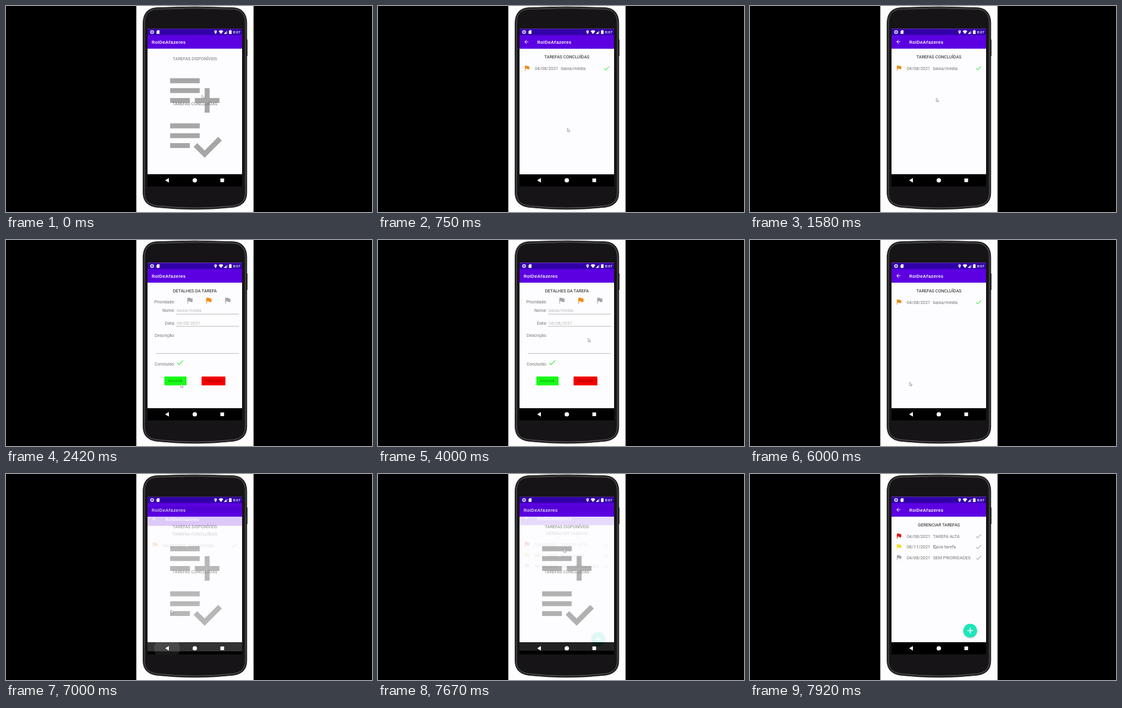
These frames come from a looping animation (600x338 px, 8000 ms). An HTML page:

```html
<!DOCTYPE html>
<html lang="pt">
<head>
<meta charset="utf-8">
<title>RolDeAfazeres</title>
<style>
html, body { margin: 0; width: 100%; height: 100%; overflow: hidden; background: #000; }
svg { display: block; width: 100vw; height: 100vh; }
text { font-family: Roboto, "Noto Sans", sans-serif; font-size: 7.25px; fill: #757575; }
.bar { font-size: 8.07px; font-weight: 500; fill: #fff; letter-spacing: .2px; }
.head { font-size: 7.1px; text-anchor: middle; }
.dark { fill: #1c1c1c; }
.label { font-size: 7.1px; text-anchor: end; }
.hint { fill: #bcbcbc; }
.btn { font-size: 5.66px; font-weight: 500; text-anchor: middle; letter-spacing: .5px; fill: #000; fill-opacity: .38; }
.clock { font-size: 6px; font-weight: 500; fill: #fff; }
</style>
</head>
<body>
<svg id="stage" viewBox="0 0 600 338" preserveAspectRatio="none"></svg>
<script>
const LOOP = 8000, STEP = 1000 / 12, SLIDE = 20.6;
const APP = 'RolDeAfazeres';
const MID = 309.7, LEFT = 232, TOP = 37.6, WIDE = 155, NAV = 276, END = 296;
const GREY = '#a7a6a7', ORANGE = '#f08a10', GREEN = '#42ee42', INDIGO = '#3200a8';

// Outlines on a 24-unit grid
const ICON = {
  flag: 'M14.4 6 14 4H5v17h2v-7h5.6l.4 2h7V6z',
  done: 'M9 16.2 4.8 12 3.4 13.4 9 19 21 7 19.6 5.6z',
  back: 'M20 11H7.8l5.6-5.6L12 4l-8 8 8 8 1.4-1.4L7.8 13H20z',
  lines: 'M2 6h12v2H2zM2 10h12v2H2zM2 14h8v2H2z',
  plus: 'M18 14v-4h-2v4h-4v2h4v4h2v-4h4v-2z',
  check: 'M21.5 11.5 23 13l-7 7-4.5-4.5L13 14l3 3z'
};

const rect = (x, y, w, h, fill, more = '') =>
  `<rect x="${x}" y="${y}" width="${w}" height="${h}" fill="${fill}" ${more}/>`;
const disc = (x, y, r, fill, more = '') =>
  `<circle cx="${x}" cy="${y}" r="${r}" fill="${fill}" ${more}/>`;
const shape = (d, fill = '#fff', more = '') => `<path d="${d}" fill="${fill}" ${more}/>`;
const text = (x, y, s, cls = '') => `<text x="${x}" y="${y}" class="${cls}">${s}</text>`;
// Icon centred on x, y
const icon = (d, x, y, k, fill) =>
  shape(d, fill, `transform="translate(${x} ${y}) scale(${k}) translate(-12 -12)"`);
const line = (x, y) => rect(x, y, 382 - x, .7, '#a4a4a4');
const title = s => text(MID, 85.9, s, 'head dark');

const screen = (id, hasBack, body) => `<g id="${id}">
  ${rect(LEFT, TOP, WIDE, END - TOP, '#fdfcfe')}
  ${rect(LEFT, TOP, WIDE, 70 - TOP, '#5c00e2')}
  ${rect(LEFT, TOP, WIDE, 10, INDIGO)}
  ${rect(LEFT, NAV, WIDE, END - NAV, '#000')}
  ${hasBack ? icon(ICON.back, 243.4, 58.7, .404, '#fff') : ''}
  ${text(hasBack ? 261 : 238.7, 61.7, APP, 'bar')}
  ${body}</g>`;

const row = (i, color, date, name, tick) => {
  const y = 102 + 17.7 * i;
  return icon(ICON.flag, 244.2, y - .3, .48, color) +
    text(257, y + 2.6, date) + text(300, y + 2.6, name) +
    icon(ICON.done, 374.7, y, .5, tick);
};

const button = (x, w, fill, s) =>
  rect(x, 224, w, 14.5, fill, 'rx="1.3"') + text(x + w / 2, 233.4, s, 'btn');

const tile = (y, mark, s) =>
  icon(ICON.lines + mark, 309.5, y + 56.3, 4.04, GREY) + text(MID, y + 2.5, s, 'head');

const home = screen('home', false,
  tile(86.5, ICON.plus, 'TAREFAS DISPONÍVEIS') +
  tile(160.5, ICON.check, 'TAREFAS CONCLUÍDAS'));

const list = screen('list', true,
  title('TAREFAS CONCLUÍDAS') + row(0, ORANGE, '04/08/2021', 'baixa/média', GREEN));

const field = (y, label, hint = '') => text(277, y, label, 'label') + text(280, y, hint, 'hint');

const detail = screen('detail', false,
  title('DETALHES DA TAREFA') +
  field(104.4, 'Prioridade:') + field(118.4, 'Nome:', 'baixa/média') +
  field(138.7, 'Data:', '04/08/2021') + field(159, 'Descrição:') + field(205.5, 'Concluído:') +
  [GREY, ORANGE, GREY].map((c, i) => icon(ICON.flag, 301.3 + 31 * i, 99.4, .57, c)).join('') +
  line(279, 121.4) + line(279, 141.4) + line(246, 185.8) +
  icon(ICON.done, 285.5, 201, .6, GREEN) +
  button(259.6, 36.4, '#16fb16', 'SALVAR') + button(320.6, 39, '#f20202', 'EXCLUIR'));

const manage = screen('manage', true,
  title('GERENCIAR TAREFAS') +
  row(0, '#e01212', '04/08/2021', 'TAREFA ALTA', GREY) +
  row(1, '#f5dc1c', '08/11/2021', 'Nova tarefa', GREY) +
  row(2, GREY, '04/08/2021', 'SEM PRIORIDADES', GREY) +
  disc(361, 258.3, 11.8, '#000', 'opacity=".13"') + disc(361, 257, 11.3, '#1de6b9') +
  shape('M356.5 257h9M361 252.5v9', 'none', 'stroke="#fff" stroke-width="1.6"'));

// Symmetric phone outline, drawn d pixels inside the edge
function shell(d, fill, stroke) {
  const l = MID - 85.4 + d, r = MID + 85.4 - d, a = MID - 63, b = MID + 63;
  const t = 2.4 + d, u = 330.5 - d;
  return shape(`M${l} 29C${l} 12 ${l + 8} ${t + 1} ${a} ${t}Q${MID} ${t - 3} ${b} ${t}` +
    `C${r - 8} ${t + 1} ${r} 12 ${r} 29V306C${r} 321 ${r - 8} ${u - 2} ${b} ${u}` +
    `Q${MID} ${u + 7} ${a} ${u}C${l + 8} ${u - 2} ${l} 321 ${l} 306Z`,
    fill, `stroke="${stroke}" stroke-width=".9"`);
}

const phone =
  rect(213.6, 0, 192.2, 338, '#fdfdfe') + rect(394.4, 55, 1.6, 27, '#444') +
  shell(.3, '#1d1d1e', '#262627') + shell(2.8, '#161417', '#68686a') +
  rect(291, 1, 36, 4, '#333335', 'rx="2"');

const status =
  disc(239.5, 42.7, 2.4, 'none', 'stroke="#fff" stroke-width="1.3"') + disc(239.5, 42.7, .7, '#fff') +
  shape('M248.3 39.8h3.3v6h-4.8v-4.4z') +
  shape('M343.6 46.2Q341.5 43.2 341.5 41.8a2.1 2.1 0 0 1 4.2 0Q345.7 43.2 343.6 46.2z') +
  disc(343.6, 41.8, .7, INDIGO) +
  shape('M348.6 41.2Q352.4 38.4 356.2 41.2L352.4 45.9z') +
  shape('M357.2 45.8 363 40v5.8z', '#fff', 'fill-opacity=".45"') + shape('M357.2 45.8 361 42v3.8z') +
  shape('M366.9 39.4h1.6v.7h1.3v5.8h-4.2v-5.8h1.3z') +
  text(372.3, 44.9, '8:07', 'clock');

const nav = shape('M261 286 267 282.3v7.4z') + disc(309.5, 286, 3.6, '#fff') +
  rect(351.5, 283, 6, 6, '#fff', 'rx=".4"');

document.getElementById('stage').innerHTML =
  `<defs><clipPath id="glass">${rect(LEFT, TOP, WIDE, END - TOP, '#fff')}</clipPath>
  <clipPath id="navbar">${rect(LEFT, NAV, WIDE, END - NAV, '#fff')}</clipPath></defs>
  ${rect(0, 0, 600, 338, '#000')}${phone}
  <g clip-path="url(#glass)">${home}${list}${detail}${manage}</g>
  <g clip-path="url(#navbar)">${disc(264, 286, 21, '#fff', 'id="ripple"')}</g>
  ${status}${nav}
  ${shape('M0 0V6.2L1.4 5 2.4 7 3.3 6.6 2.5 4.6H4.3Z', '#f6f6f6',
    'id="cursor" stroke="#808080" stroke-width=".6" stroke-linejoin="round"')}`;

// When each window slides in and out over the ones below it
const windows = [
  { id: 'list', open: 535, close: 6780 },
  { id: 'detail', open: 1850, close: 5560 },
  { id: 'manage', open: 7640, close: Infinity }
];
const PRESS = 90; // the back button lights up this long before a window closes

// Pointer moves: start, end, x, y
const moves = [
  [0, 330, 310.5, 200], [1420, 1750, 300, 100], [1920, 2420, 286.5, 236],
  [2420, 3080, 286, 201], [3250, 3750, 331, 97], [3920, 4080, 358, 225],
  [4250, 4670, 240, 55], [4670, 5080, 267, 285], [5580, 6000, 261.7, 233],
  [6000, 6420, 266, 286], [6670, 7000, 270.5, 223], [7000, 7420, 305, 125],
  [7580, 7830, 302, 116]
];

const clamp = v => Math.max(0, Math.min(1, v));
const ease = u => u * u * (3 - 2 * u);
const el = id => document.getElementById(id);

function pointer(t) {
  let x = 321, y = 146;
  for (const [from, to, toX, toY] of moves) {
    const k = ease(clamp((t - from) / (to - from)));
    x += (toX - x) * k;
    y += (toY - y) * k;
  }
  return `translate(${x} ${y})`;
}

function place({ id, open, close }, t) {
  const enter = clamp((t - open) / 350), leave = clamp((t - close) / 250);
  const y = SLIDE * ((1 - enter) ** 5 + leave ** 2.5);
  const alpha = clamp((t - open) / 200) * (1 - clamp((t - close - 100) / 150));
  const g = el(id);
  g.setAttribute('transform', `translate(0 ${y})`);
  g.setAttribute('opacity', alpha);
  g.setAttribute('display', alpha > 0 ? 'inline' : 'none');
}

function glow(t, close) {
  const age = t - close + PRESS;
  return .2 * clamp(age / 80) * (1 - clamp((age - 200) / 220));
}

function draw(t) {
  windows.forEach(w => place(w, t));
  el('ripple').setAttribute('opacity', Math.max(...windows.map(w => glow(t, w.close))));
  el('cursor').setAttribute('transform', pointer(t));
}

const start = performance.now();
function tick() {
  const t = (performance.now() - start) % LOOP;
  draw(Math.min(95, Math.floor((t + 4) / STEP)) * STEP);
  requestAnimationFrame(tick);
}
tick();
</script>
</body>
</html>
```
